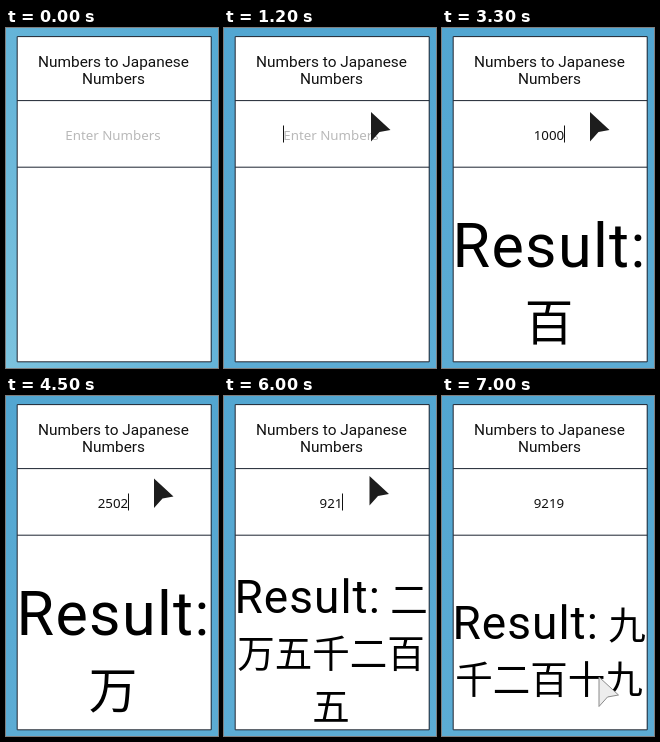
Animation of 212x340 px, one loop 7100 ms. Source, as an HTML page:

```html
<!DOCTYPE html>
<html lang="en">
<head>
<meta charset="utf-8">
<title>Numbers to Japanese Numbers</title>
<style>
  html, body { margin: 0; width: 100%; height: 100%; overflow: hidden; background: #57a9d2; }
  svg { display: block; width: 212px; height: 340px; }
  text { text-anchor: middle; white-space: pre; }
  .title { font: 15.4px Roboto, sans-serif; fill: #111; }
  .field { font: 500 13.333px "Noto Sans", sans-serif; fill: #111; }
  .label { font-family: Roboto, sans-serif; letter-spacing: .022em; text-anchor: start; }
  .kanji { font-family: "Noto Sans CJK JP", "Noto Sans CJK", sans-serif; }
  .frame { fill: none; stroke: #1c2430; }
</style>
</head>
<body>
<svg viewBox="0 0 212 340">
  <defs>
    <linearGradient id="sky" x2="0" y2="1">
      <stop offset="0" stop-color="#52a6d1"/>
      <stop offset="1" stop-color="#5cacd4"/>
    </linearGradient>
    <linearGradient id="haze" x1="1" x2="0" y2="1">
      <stop offset="0" stop-color="#55aad4"/>
      <stop offset=".6" stop-color="#68b6d9"/>
      <stop offset="1" stop-color="#7cc3de"/>
    </linearGradient>
  </defs>
  <rect width="212" height="340" fill="url(#sky)"/>
  <rect id="hazeLayer" width="212" height="340" fill="url(#haze)"/>
  <rect x="11" y="8.5" width="194" height="325.5" fill="#fff"/>
  <path class="frame" d="M11.2 8.6h194v325.2h-194zM11.2 72.6h194M11.2 139.2h194"/>
  <text class="title" x="107.5" y="39">Numbers to Japanese</text>
  <text class="title" x="107.5" y="56">Numbers</text>
  <text class="field" id="field" x="107" y="112"></text>
  <path id="caret" d="M0 97.5v17" stroke="#111"/>
  <g id="result"></g>
  <path id="cursor" d="M0 0L19.5 18 8.5 20 0 29.5z"/>
</svg>
<script>
const LOOP = 7100, STEP = 100, CENTER = 107;
const $ = id => document.getElementById(id);

// [time, typed text]
const typing = [
  [0, ""], [1400, "1"], [1600, "10"], [1800, "100"],
  [3200, "1000"], [3400, "10000"],
  [4200, "2"], [4300, "25"], [4400, "250"], [4500, "2502"], [4600, "2520"], [4700, "25205"],
  [5600, "9"], [5800, "92"], [6000, "921"], [6100, "9219"]
];
// [time, label baseline, kanji beside the label, kanji lines below]
const results = [
  [0],
  [2100, 238.5, "", "百"],
  [3700, 238.5, "", "万"],
  [5000, 217, "二", "万五千二百", "五"],
  [6300, 243, "九", "千二百十九"]
];
const focused = [[1100, 2100], [2600, 3700], [4000, 5000], [5500, 6300]];
// [time, x, y]
const pointer = [
  [700, 200, 345], [1200, 147, 84], [2100, 148, 84], [3800, 148, 84], [4000, 148, 82.5],
  [5400, 148, 82.5], [5600, 145.5, 80], [6700, 145.5, 80], [7000, 157, 281]
];

const current = (list, t) => list.findLast(item => item[0] <= t);

function pointerAt(t) {
  const i = pointer.findIndex(p => p[0] > t);
  if (i === 0) return [-99, -99];
  if (i < 0) return pointer.at(-1).slice(1);
  const a = pointer[i - 1], b = pointer[i];
  const k = (t - a[0]) / (b[0] - a[0]), ease = k * k * (3 - 2 * k);
  return [1, 2].map(n => a[n] + (b[n] - a[n]) * ease);
}

function resultMarkup([, base, beside, ...lines]) {
  if (!base) return "";
  const [size, kanjiSize, leading] = beside ? [46, 37.5, 53.7] : [61, 48.5, 73.5];
  const kanji = (text, cx, y) =>
    `<text class="kanji" font-size="${kanjiSize}" x="${cx}" y="${y}">${text}</text>`;
  return `<text class="label" font-size="${size}" x="10.5" y="${base}">Result:</text>` +
    kanji(beside, 185, base) +
    lines.map((line, i) => kanji(line, CENTER, base + leading * (i + 1))).join("");
}

let shown;
function draw(t) {
  $("hazeLayer").setAttribute("opacity", Math.max(0, 1 - t / 600));

  const text = current(typing, t)[1], field = $("field");
  field.textContent = text || "Enter Numbers";
  field.style.fill = text ? "#111" : "#b9b9b9";
  const half = field.getComputedTextLength() / 2;
  const caretX = Math.floor(CENTER + (text ? half : -half)) + .5;
  $("caret").setAttribute("transform", `translate(${caretX})`);
  $("caret").setAttribute("opacity", focused.some(([a, b]) => t >= a && t < b) ? 1 : 0);

  const result = current(results, t);
  if (result !== shown) $("result").innerHTML = resultMarkup(shown = result);

  const [x, y] = pointerAt(t), overField = y > 72 && y < 139;
  const cursor = $("cursor");
  cursor.setAttribute("transform", `translate(${x} ${y})`);
  cursor.setAttribute("fill", overField ? "#1d1d1d" : "#ededed");
  cursor.setAttribute("stroke", overField ? "none" : "#8a8a8a");
}

function tick() {
  draw(Math.floor(performance.now() % LOOP / STEP) * STEP);
  requestAnimationFrame(tick);
}
tick();
</script>
</body>
</html>
```
